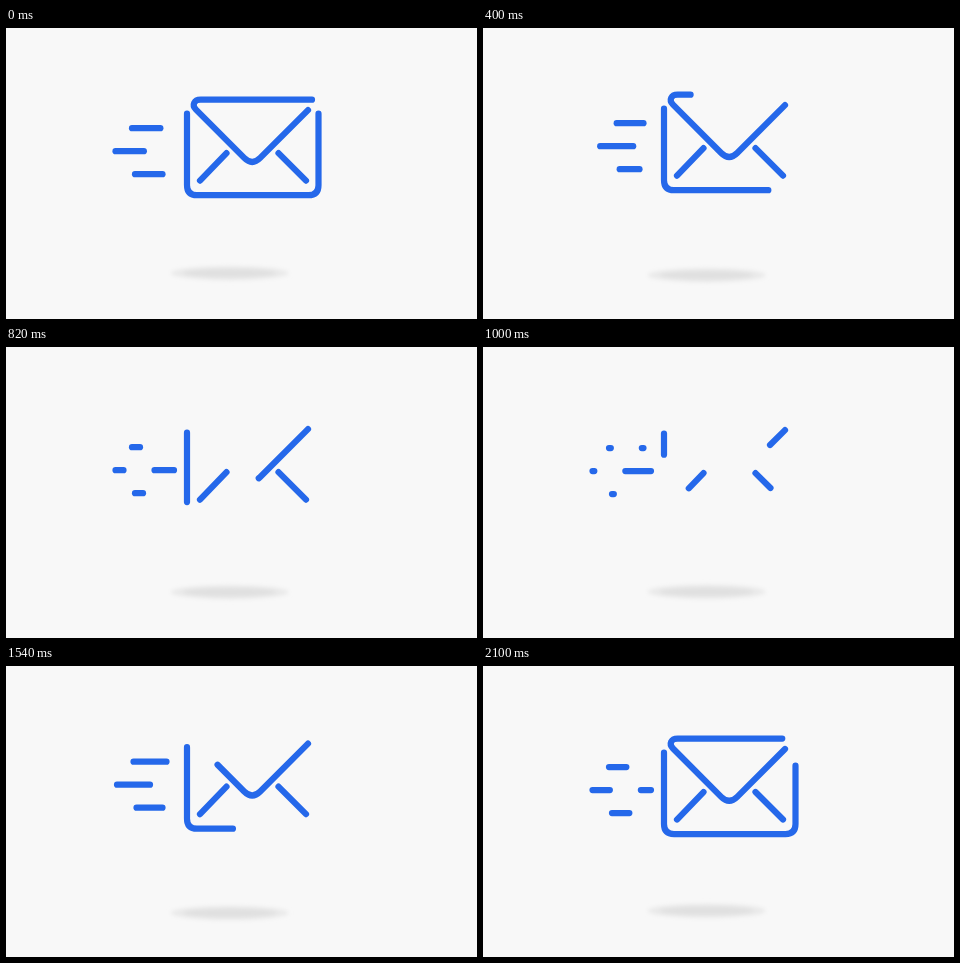
An HTML page that plays this animation: 471x291 px, repeating every 2.12 s.

```html
<!DOCTYPE html>
<html lang="en">
<head>
<meta charset="utf-8">
<title>Sending mail</title>
<style>
html, body { margin: 0; width: 100%; height: 100%; overflow: hidden; background: #f8f8f8; }
svg { display: block; width: 100%; height: 100%; }
#mail { fill: none; stroke: #2568ea; stroke-width: 6.2; stroke-linecap: round; stroke-linejoin: round; }
</style>
</head>
<body>
<svg viewBox="0 0 471 291">
  <filter id="soft" x="-10%" y="-60%" width="120%" height="220%"><feGaussianBlur stdDeviation="1.9"/></filter>
  <g id="shadow" filter="url(#soft)">
    <ellipse cx="223.7" cy="245" rx="59" ry="7" fill="#e9e9e9"/>
    <ellipse cx="223.7" cy="245" rx="47" ry="4.4" fill="#e0e0e0"/>
  </g>
  <g id="mail">
    <g id="outline">
      <path d="M181 86V157.5Q181 167.5 191 167.5H302.5Q312.5 167.5 312.5 157.5V86"/>
      <path d="M302 82.5L254.2 130.3Q246.2 138.3 238.2 130.3L190 82C185.5 77.5 188 72 194.5 72H306"/>
      <path d="M220.5 125.5L194 153"/>
      <path d="M272.5 125.5L300 153"/>
    </g>
    <g id="speed" stroke-dasharray="33 31">
      <path d="M126 100.5H160.5"/>
      <path d="M109.5 123.5H168"/>
      <path d="M129 146.5H156.5"/>
    </g>
  </g>
</svg>
<script>
const LOOP = 2120, TURN = 1080;
const BOB = 1095, PEAK = 410;
const [mail, shadow, outline, speed] =
  ['mail', 'shadow', 'outline', 'speed'].map(id => document.getElementById(id));

// Height offset: a rounded triangle wave, highest on screen at PEAK.
function bob(t) {
  const phase = (t - PEAK) / BOB;
  const away = 2 * Math.abs(phase - Math.round(phase));
  return -5.6 + 6.6 * away ** 0.8;
}

// Visible length shared by all envelope strokes: shrinks, then grows again.
const drawn = t => 0.268 * Math.abs(t - TURN);

// Dashes slide left while the envelope is erased, and back while it is drawn.
const drift = t => t < TURN
  ? -96 + 91.5 * (1 - t / TURN) ** 1.8
  : -96 + 82 * ((t - TURN) / (LOOP - TURN)) ** 1.1;

function draw(t) {
  const y = bob(t);
  mail.setAttribute('transform', `translate(0 ${y})`);
  shadow.setAttribute('transform', `translate(0 ${-0.4 * y})`);
  outline.setAttribute('stroke-dasharray', `${drawn(t)} 999`);
  speed.setAttribute('stroke-dashoffset', -drift(t));
}

const start = performance.now();
function tick() {
  draw((performance.now() - start) % LOOP);
  requestAnimationFrame(tick);
}
tick();
</script>
</body>
</html>
```
